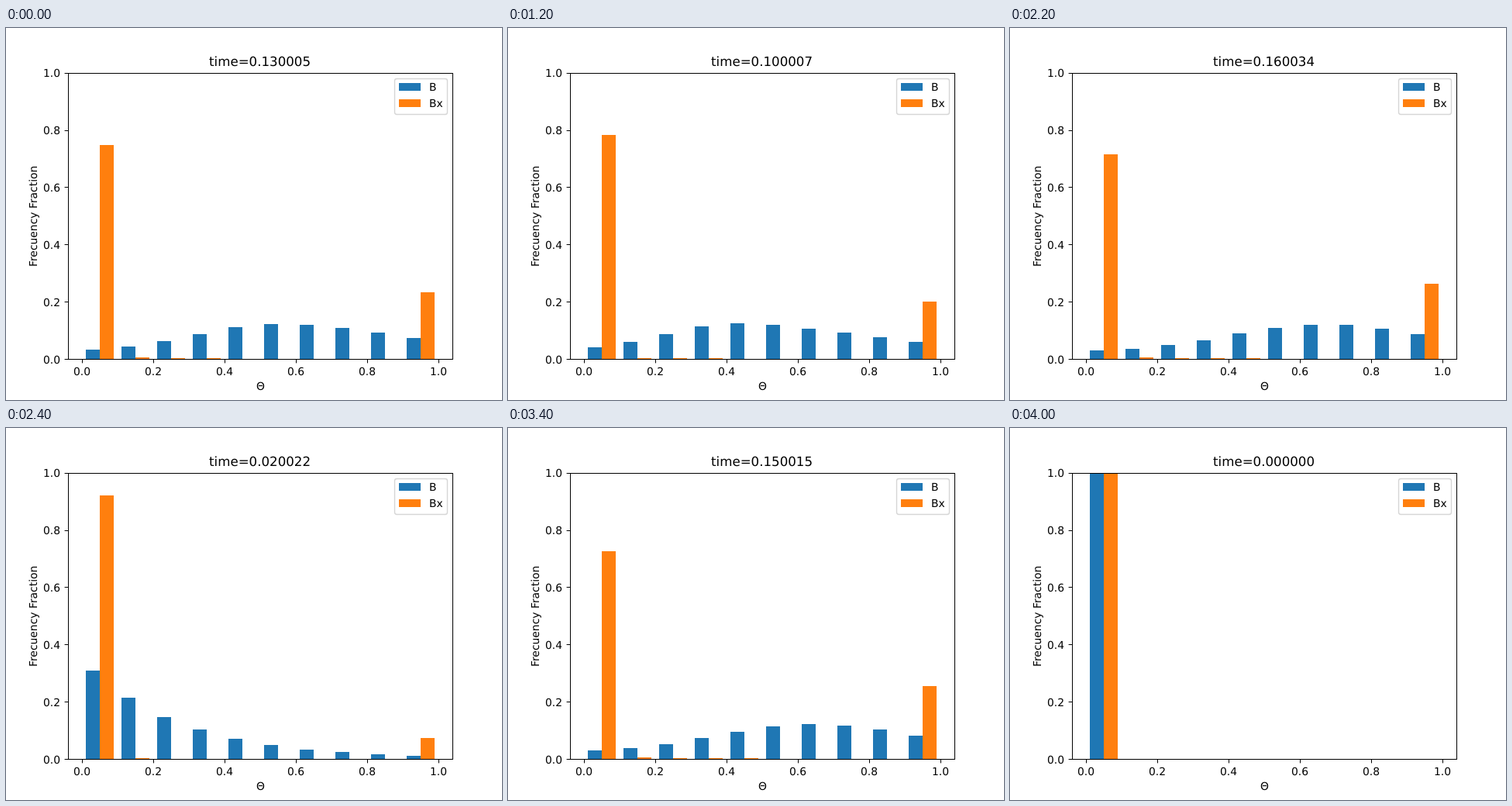
These frames come from a looping animation (640x480 px, 4.2 s). An HTML page with a canvas:

```html
<!DOCTYPE html>
<html>
<head>
<meta charset="utf-8">
<style>
html, body { margin: 0; width: 100%; height: 100%; overflow: hidden; background: #fff; }
canvas { display: block; }
</style>
</head>
<body>
<canvas id="chart" width="640" height="480"></canvas>
<script>
const ctx = document.getElementById('chart').getContext('2d');
const BLUE = '#1f77b4', ORANGE = '#ff7f0e';
const BASE = 427, FULL = 369, STEP = 200;

// simulation times in the order shown
const times = [
  0.130005, 0.080008, 0.200020, 0.140012, 0.060026, 0.050037, 0.100007,
  0.030034, 0.040045, 0.180029, 0.170032, 0.160034, 0.020022, 0.070018,
  0.090007, 0.120006, 0.110006, 0.150015, 0.190025, 0.010011, 0
];

// height of B in bin i at time n (hundredths)
function blue(i, n) {
  if (n < 3.5) {
    // the first spread is geometric
    const q = 1 - Math.exp(-n / 1.7);
    return FULL * (1 - q) * q ** i;
  }
  // then a lopsided wave travels to the right
  const d = i - (0.4 + 0.37 * n);
  const peak = 44 + 26 * Math.exp(-n / 4.3);
  if (d < 0) return 9 + (peak - 9) * Math.exp(-d * d / (6 + 0.028 * n * n));
  const width = 2.9 + 3 * Math.cos((n - 8.5) / 7);
  return peak * Math.exp(-((d / width) ** (0.6 + 0.1 * n)));
}

// Bx leaks from the first bin to the last, with thin traces between
function orange(i, n) {
  const first = Math.exp(-0.0512 * n ** 0.677);
  if (i === 0) return FULL * first;
  if (i === 9) return FULL * 0.925 * (1 - first);
  if (i === 1) return Math.ceil(n / 12);
  return i - 1 <= Math.floor(n / 4.4) ? 1 : 0;
}

// text starts on a whole pixel; align is 0 left, 0.5 centre, 1 right
function text(str, x, y, align = 0.5, size = 13.89) {
  ctx.font = `${size}px "DejaVu Sans", sans-serif`;
  ctx.textRendering = 'geometricPrecision';
  ctx.fillStyle = '#000';
  ctx.fillText(str, Math.round(x - align * ctx.measureText(str).width), y);
}

function rect(color, x, y, w, h) {
  ctx.fillStyle = color;
  ctx.fillRect(x, y, w, h);
}

function bar(color, x, height) {
  const h = Math.round(height);
  rect(color, x, BASE - h, 18, h);
}

function axes() {
  ctx.strokeStyle = '#000';
  ctx.lineWidth = 1;
  ctx.strokeRect(80.5, 58.5, 496, 369);
  for (let i = 0; i < 6; i++) {
    const label = (i / 5).toFixed(1);
    const x = 98 + 92 * i, y = 427.2 - 73.92 * i;
    rect('#000', x, 428, 1, 4.4);
    rect('#000', 75.6, Math.round(y), 4.4, 1);
    text(label, x, 448);
    text(label, 70.3, Math.round(y + 5.4), 1);
  }
  text('Θ', 328, 467);
  ctx.save();
  ctx.translate(40, 243);
  ctx.rotate(-Math.PI / 2);
  text('Frecuency Fraction', 0, 0);
  ctx.restore();
}

function legend() {
  ctx.beginPath();
  ctx.roundRect(501.5, 65.5, 68, 46, 2.8);
  ctx.fillStyle = 'rgba(255,255,255,.8)';
  ctx.fill();
  ctx.strokeStyle = 'rgba(204,204,204,.8)';
  ctx.lineWidth = 1.39;
  ctx.stroke();
  rect(BLUE, 507, 71, 28, 10);
  rect(ORANGE, 507, 92, 28, 10);
  text('B', 546, 81, 0);
  text('Bx', 546, 102, 0);
}

function draw(time) {
  const n = time * 100;
  rect('#fff', 0, 0, 640, 480);
  for (let i = 0; i < 10; i++) {
    const x = 103 + 46 * i;
    bar(BLUE, x, blue(i, n));
    bar(ORANGE, x + 18, orange(i, n));
  }
  axes();
  legend();
  text('time=' + time.toFixed(6), 328, 49, 0.5, 16.67);
}

let start;
function tick(now) {
  start ??= now;
  draw(times[Math.floor((now - start) / STEP) % times.length]);
  requestAnimationFrame(tick);
}
draw(times[0]);
requestAnimationFrame(tick);
</script>
</body>
</html>
```
